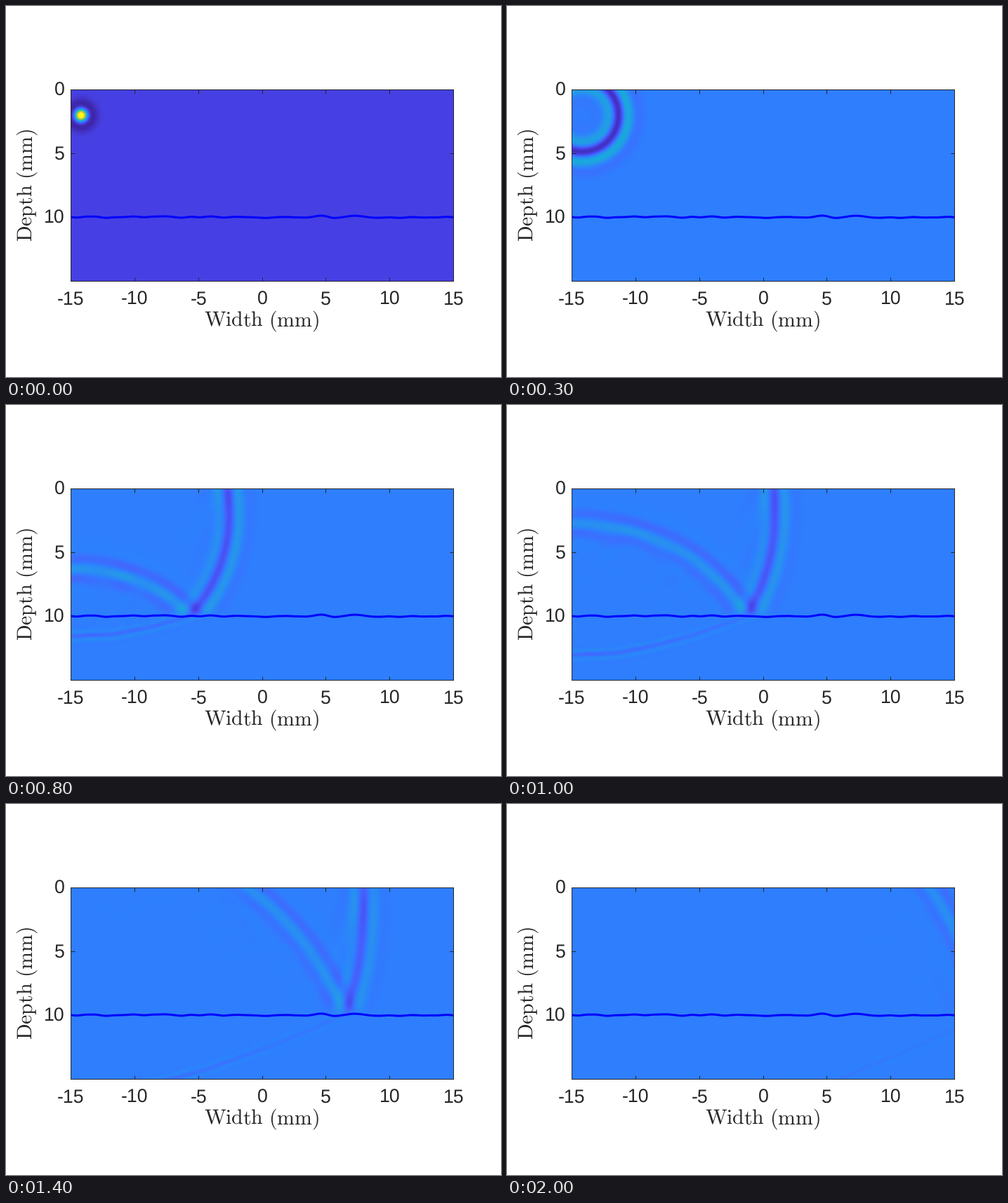
These frames come from a looping animation (705 px wide and 529 px high, 2.1 s). A matplotlib script:

```python
import numpy as np
import matplotlib.pyplot as plt
from matplotlib.animation import FuncAnimation
from matplotlib.colors import LinearSegmentedColormap

W, H, DPI = 705, 529, 100
PX = 72 / DPI
INK = "#262626"
LEFT, TOP, WIDTH, HEIGHT = 92, 119, 545, 273
FRAMES, INTERVAL = 21, 100

plt.rcParams["mathtext.fontset"] = "cm"
plt.rcParams["text.hinting"] = "none"

PARULA = LinearSegmentedColormap.from_list("parula", [
    (0, "#3e26a8"), (0.095, "#4741e5"), (0.19, "#4563fd"),
    (0.257, "#2e7fff"), (0.333, "#2796eb"), (0.43, "#12b1d6"),
    (0.52, "#24c1ae"), (0.64, "#81cc59"), (0.81, "#f0ba36"),
    (0.86, "#fec338"), (1, "#f9fb15")])

# Acoustic model: millimetres, time in snapshots
DX, NX, NZ, PAD = 0.06, 500, 250, 56
SUB, LEAD = 50, 60
C_TOP, C_LOW = 1.755, 0.75
RHO_TOP, RHO_LOW = 1.85, 1.0
PULSE_AT, PULSE_WIDTH = 0.265, 0.31


def rough_surface():
    """Smoothed random profile around a depth of 10 mm."""
    x = np.linspace(-15, 15, 121)
    kernel = np.exp(-np.linspace(-2, 2, 9) ** 2)
    noise = np.random.default_rng(4).normal(size=x.size)
    z = np.convolve(noise, kernel, mode="same")
    return x, 10 + 0.04 * (z - z.mean()) / z.std()


def pulse(t):
    u = (t - PULSE_AT) / PULSE_WIDTH
    return (u ** 3 - 3 * u) * np.exp(-u ** 2 / 2)


def sponge(n):
    i = np.arange(n)
    depth = np.maximum(0, PAD - np.minimum(i, n - 1 - i))
    return np.exp(-(0.0058 * depth) ** 2)


def simulate(count, surface):
    x = -15 + (np.arange(NX + 2 * PAD) - PAD + 0.5) * DX
    z = (np.arange(NZ + 2 * PAD) - PAD + 0.5) * DX
    low = z[:, None] > np.interp(x, *surface)[None, :]
    c = np.where(low, C_LOW, C_TOP)
    rho = np.where(low, RHO_LOW, RHO_TOP)
    dt = 1 / SUB
    k = (dt / DX * rho * c ** 2).astype("f4")[1:-1, 1:-1]
    bx = (2 * dt / DX / (rho[:, 1:] + rho[:, :-1])).astype("f4")
    bz = (2 * dt / DX / (rho[1:] + rho[:-1])).astype("f4")
    damp = np.outer(sponge(z.size), sponge(x.size)).astype("f4")
    spot = np.exp(-((x[None, :] + 14.18) ** 2 + (z[:, None] - 2.02) ** 2)
                  / (2 * 0.08 ** 2)).astype("f4")
    p = np.zeros_like(damp)
    vx, vz = np.zeros_like(bx), np.zeros_like(bz)
    shots = []
    for n in range(1 - LEAD, SUB * (count - 1) + 1):
        vx -= bx * (p[:, 1:] - p[:, :-1])
        vz -= bz * (p[1:] - p[:-1])
        vx *= damp[:, 1:]
        vz *= damp[1:]
        p[1:-1, 1:-1] -= k * (vx[1:-1, 1:] - vx[1:-1, :-1]
                              + vz[1:, 1:-1] - vz[:-1, 1:-1])
        p += spot * np.float32(dt * pulse(n * dt))
        p *= damp
        if n >= 0 and n % SUB == 0:
            shots.append(p[PAD:-PAD, PAD:-PAD].copy())
    return shots


def clim(low, zero):
    """Colour limits that put pressure 0 at the fraction `zero`."""
    return low, -low * (1 - zero) / zero


surface = rough_surface()
shots = simulate(FRAMES - 1, surface)
first_clim = clim(shots[0].min(), 0.095)
main_clim = clim(shots[4].min() * 1.645, 0.257)

fig = plt.figure(figsize=(W / DPI, H / DPI), dpi=DPI, facecolor="white")
ax = fig.add_axes([LEFT / W, 1 - (TOP + HEIGHT) / H, WIDTH / W, HEIGHT / H])
image = ax.imshow(shots[0], cmap=PARULA, extent=(-15, 15, 15, 0),
                  aspect="auto", interpolation="bilinear")
ax.plot(*surface, color="#0000ff", lw=3 * PX)
ax.set(xlim=(-15, 15), ylim=(15, 0),
       xticks=range(-15, 16, 5), yticks=(0, 5, 10))
ax.tick_params(direction="in", length=5.5 * PX, width=PX, color=INK,
               top=True, right=True, labelbottom=False, labelleft=False)
for spine in ax.spines.values():
    spine.set(linewidth=PX, edgecolor=INK)


def put(x, y, text, size, **kw):
    style = dict(ha="center", va="baseline", color=INK, fontsize=size * PX)
    fig.text(x / W, 1 - y / H, text, **{**style, **kw})


for v in range(-15, 16, 5):
    put(LEFT + 0.5 + (v + 15) * WIDTH / 30, 425.5, str(v), 26.67,
        family="Liberation Sans")
for v in (0, 5, 10):
    put(84, TOP + v * HEIGHT / 15 + 9, str(v), 26.67, ha="right",
        family="Liberation Sans")
put(364, 457, r"$\mathrm{Width\ (mm)}$", 29.8)
put(38, 255.5, r"$\mathrm{Depth\ (mm)}$", 29.8, rotation=90,
    rotation_mode="anchor")


def update(i):
    # The second snapshot is held for two ticks
    k = i if i < 2 else i - 1
    image.set_data(shots[k])
    image.set_clim(*(main_clim if k else first_clim))
    return [image]


anim = FuncAnimation(fig, update, frames=FRAMES, interval=INTERVAL,
                     repeat=True, repeat_delay=0, blit=False)
plt.show()
```
